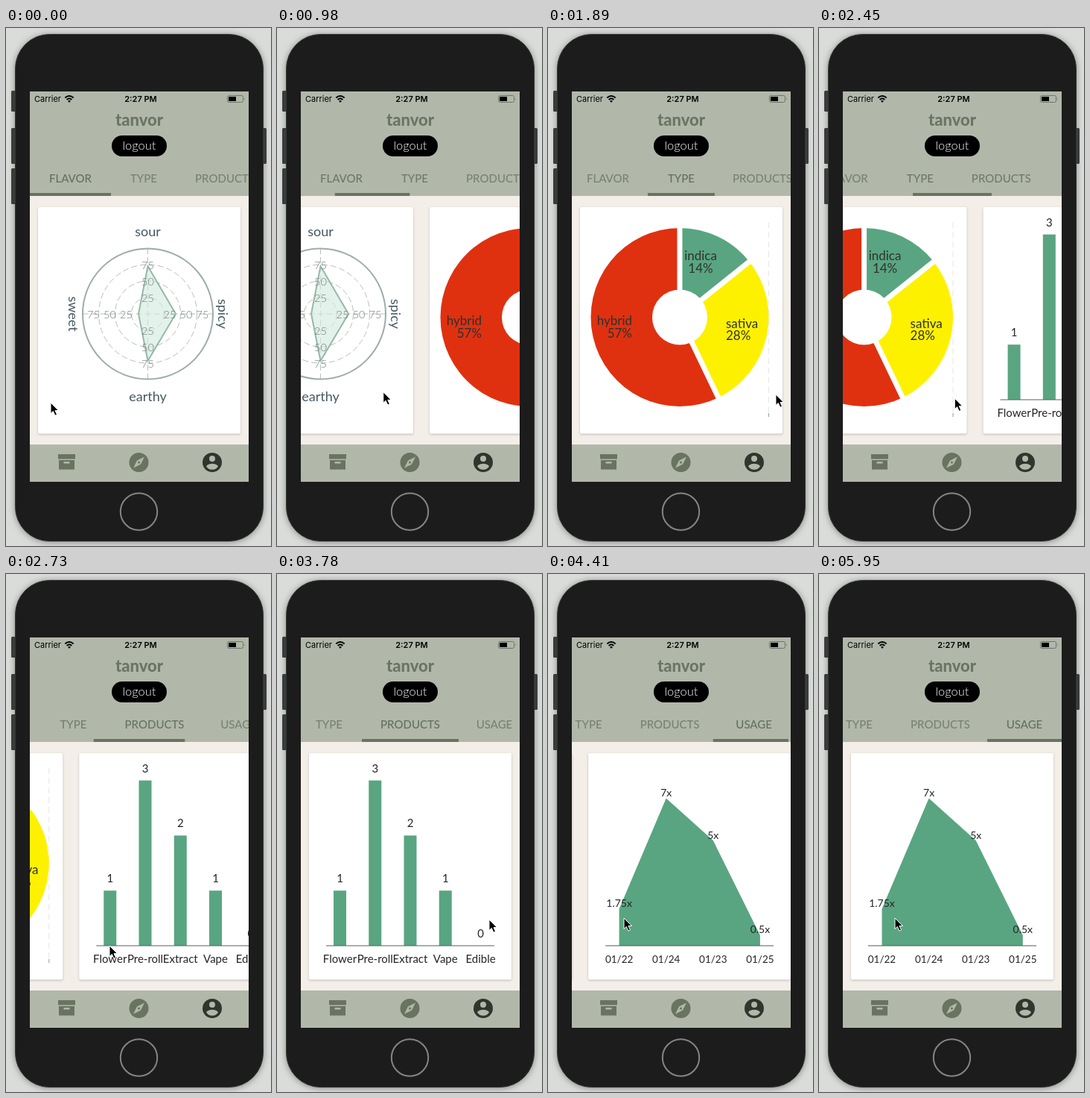
Recreate the animation shown at these times as an HTML page. Size 356 by 694 pixels, loop 6.02 s.

```html
<!DOCTYPE html>
<html lang="en">
<head>
<meta charset="utf-8">
<title>Profile charts</title>
<style>
  html, body { margin: 0; width: 100%; height: 100%; overflow: hidden; background: #d9dcd8; }
  svg { display: block; width: 356px; height: 694px; font-family: Lato, "Open Sans", sans-serif; }
  .status { font-family: Inter, Roboto, sans-serif; font-size: 11px; }
  .phone { filter: drop-shadow(0 1px 4px rgba(60, 64, 60, .55)); }
  .card { fill: #fff; filter: drop-shadow(0 1px 1.5px rgba(0, 0, 0, .22)); }
  .tab { font-size: 15px; font-weight: 500; fill: #657060; }
  .axis { font-size: 15px; fill: #252525; }
  .taste { font-size: 18px; fill: #455a64; }
  .tick { font-size: 14.5px; font-weight: 300; fill: #707b78; }
  .slice { font-size: 17px; fill: #303030; }
  .mid text, text.mid { text-anchor: middle; }
</style>
</head>
<body>
<svg viewBox="0 0 356 694" xmlns="http://www.w3.org/2000/svg">
  <defs>
    <clipPath id="screen"><rect x="32" y="85" width="294" height="523"/></clipPath>
    <clipPath id="body"><rect x="32" y="225" width="294" height="333"/></clipPath>
  </defs>

  <g fill="#3a3b3b">
    <rect x="7" y="84" width="7" height="28" rx="1.5"/>
    <rect x="7" y="134" width="7" height="48" rx="1.5"/>
    <rect x="7" y="188" width="7" height="48" rx="1.5"/>
    <rect x="344" y="134" width="6" height="48" rx="1.5"/>
  </g>
  <rect class="phone" x="12.5" y="8.5" width="333" height="679" rx="46" fill="#1c1c1c" stroke="#343535"/>
  <circle cx="178.5" cy="648" r="24.7" fill="none" stroke="#858585" stroke-width="2"/>

  <rect x="32" y="85" width="294" height="523" fill="#f4eee9"/>
  <g clip-path="url(#body)"><g id="pages"></g></g>

  <g clip-path="url(#screen)">
    <rect x="32" y="85" width="294" height="140" fill="#b1b8aa"/>
    <rect x="32" y="558" width="294" height="50" fill="#b1b8aa"/>
    <g id="tabs" class="mid"></g>
    <rect id="bar" y="221" height="4" fill="#69735f"/>
  </g>

  <g class="status">
    <text x="38" y="99">Carrier</text>
    <text class="mid" x="181" y="99" font-weight="600">2:27 PM</text>
  </g>
  <g fill="none" stroke="#000" stroke-width="1.9">
    <path d="M79.3 93.4q5.7 -4.8 11.4 0M81.6 96q3.4 -2.8 6.8 0"/>
    <path d="M83 97.7q2 -1.5 4 0l-2 2.2z" fill="#000" stroke="none"/>
  </g>
  <rect x="297.5" y="90.5" width="21" height="9" rx="2" fill="none" stroke="#6d7368"/>
  <rect x="299" y="92" width="10" height="6" fill="#000"/>
  <path d="M320 93.5q1.8 1.5 0 3z" fill="#6d7368"/>

  <text class="mid" x="179" y="131" font-size="22" font-weight="800" fill="#6b7562">tanvor</text>
  <rect x="142" y="144" width="74" height="28" rx="14"/>
  <text class="mid" x="179" y="163" font-size="16.5" font-weight="300" fill="#fff">logout</text>

  <g fill="#69735f">
    <path d="M70 571h23v6.500h-23z"/>
    <path d="M71 579h21v12.500h-21zM77.500 581v2.500h8v-2.500z" fill-rule="evenodd"/>
    <circle cx="178.500" cy="582" r="13"/>
  </g>
  <path d="M186 574.500L181 584.500L171 589.500L176 579.500z" fill="#b1b8aa"/>
  <circle cx="178.500" cy="582" r="1.500" fill="#69735f"/>
  <circle cx="277" cy="582" r="13" fill="#30362e"/>
  <circle cx="277" cy="577" r="4" fill="#b1b8aa"/>
  <path d="M269 587.300q2 -3.500 8 -3.500t8 3.500q-3 4.500 -8 4.500t-8 -4.500z" fill="#b1b8aa"/>

  <path id="cursor" d="M0 0V14.500L3.300 11.400L5.900 17.200L8.500 16L6 10.500H10.500Z" stroke="#fff" stroke-width="1"/>
</svg>

<script>
const LOOP = 6020, STEP = 70, PAGE = 294, LEFT = 32;
const GREEN = '#59a581';
const $ = id => document.getElementById(id);

const text = (x, y, s, cls, extra = '') => `<text x="${x}" y="${y}" class="${cls}" ${extra}>${s}</text>`;
const line = (x1, y1, x2, y2, extra) => `<path d="M${x1} ${y1}L${x2} ${y2}" fill="none" ${extra}/>`;
const ring = (r, extra) => `<circle cx="190.500" cy="383" r="${r}" fill="none" ${extra}/>`;

function radar() {
  const cx = 190.5, cy = 383;
  const dash = 'stroke="#b9bebb" stroke-dasharray="8 4"';
  let s = line(cx, cy - 88, cx, cy + 88, dash) + line(cx - 88, cy, cx + 88, cy, dash);
  for (const r of [22, 44, 66]) s += ring(r, dash);
  s += ring(87.5, 'stroke="#9dacaa" stroke-width="2"');
  s += `<path d="M190.500 319L228 383L190.500 446L178 383Z" fill="#d4ebe0" fill-opacity=".65" stroke="#96b9a8" stroke-width="2"/>`;
  [25, 50, 75].forEach((n, i) => {
    const r = 22 * (i + 1);
    s += text(cx, cy - r + 6, n, 'tick mid') + text(cx, cy + r + 6, n, 'tick mid');
    s += text(cx - r - 7, cy + 5.5, n, 'tick mid') + text(cx + r + 7.5, cy + 5.5, n, 'tick mid');
  });
  s += text(190.5, 279, 'sour', 'taste mid') + text(190.5, 500, 'earthy', 'taste mid');
  s += text(0, 0, 'sweet', 'taste mid', 'transform="translate(84 383) rotate(90)"');
  s += text(0, 0, 'spicy', 'taste mid', 'transform="translate(285 383) rotate(90)"');
  return s;
}

function pie() {
  const cx = 177, cy = 387.5, R = 119.5;
  const at = (f, r) => [cx + r * Math.sin(f * 2 * Math.PI), cy - r * Math.cos(f * 2 * Math.PI)];
  const cuts = [0, 1 / 7, 3 / 7, 1];
  let s = line(296.5, 260, 296.5, 516, 'stroke="#e6e6e6" stroke-dasharray="8 5"')
        + line(296.5, 516, 296.5, 521, 'stroke="#999"');
  [GREEN, '#fdf100', '#df3110'].forEach((color, i) => {
    const [a, b] = [cuts[i], cuts[i + 1]];
    s += `<path d="M${cx} ${cy}L${at(a, R)}A${R} ${R} 0 ${b - a > .5 ? 1 : 0} 1 ${at(b, R)}Z" fill="${color}"/>`;
  });
  for (const f of cuts.slice(0, 3)) s += line(cx, cy, ...at(f, R + 2), 'stroke="#fff" stroke-width="7"');
  s += `<circle cx="${cx}" cy="${cy}" r="37" fill="#fff"/>`;
  s += text(205, 311, 'indica', 'slice mid') + text(205, 328, '14%', 'slice mid', 'font-size="16"');
  s += text(239, 402, 'sativa', 'slice') + text(239, 418, '28%', 'slice');
  s += text(113, 398, 'hybrid', 'slice', 'text-anchor="end"') + text(113, 415, '57%', 'slice', 'text-anchor="end"');
  return s;
}

function bars() {
  const names = ['Flower', 'Pre-roll', 'Extract', 'Vape', 'Edible'];
  let s = '';
  [1, 3, 2, 1, 0].forEach((n, i) => {
    const x = 84.5 + 47.25 * i, h = 73.8 * n;
    s += `<rect x="${x - 8.5}" y="${498 - h}" width="17" height="${h}" fill="${GREEN}"/>`;
    s += text(x, 487 - h, n, 'axis mid') + text(x, 521, names[i], 'axis mid');
  });
  return s + line(66, 498, 292, 498, 'stroke="#59605a"');
}

function area() {
  const values = [1.75, 7, 5, .5], days = [22, 24, 23, 25];
  const x = i => 84.5 + 63.1 * i, y = v => 498 - 28.2 * v;
  let s = `<path d="M${x(0)} 498${values.map((v, i) => `L${x(i)} ${y(v)}`).join('')}V498Z" fill="${GREEN}"/>`;
  s += line(66, 498, 292, 498, 'stroke="#4b5f50"');
  values.forEach((v, i) => {
    s += text(x(i), y(v) - 2.5, v + 'x', 'axis mid', 'style="font-size:14px"');
    s += text(x(i), 521, '01/' + days[i], 'axis mid', 'style="font-size:13.5px"');
  });
  return s;
}

$('pages').innerHTML = [radar, pie, bars, area].map((draw, i) =>
  `<g transform="translate(${PAGE * i})"><rect class="card" x="43" y="240" width="272" height="303.500" rx="2"/>${draw()}</g>`).join('');

const tabs = [['FLAVOR', 0, 109], ['TYPE', 108, 90], ['PRODUCTS', 197, 130], ['USAGE', 325, 100]];
$('tabs').innerHTML = tabs.map(([s, x, w]) => text(LEFT + x + w / 2, 207, s, 'tab')).join('');
const labels = [...$('tabs').children];

// Keys are [time, ...values]; a segment listed in `soft` decelerates into its end.
function sample(keys, t, soft = []) {
  const i = keys.findIndex(k => k[0] > t);
  if (i === 0) return keys[0].slice(1);
  if (i < 0) return keys[keys.length - 1].slice(1);
  const a = keys[i - 1], b = keys[i];
  let u = (t - a[0]) / (b[0] - a[0]);
  if (soft.includes(b[0])) u = 1 - (1 - u) ** 3;
  return a.slice(1).map((v, k) => v + (b[k + 1] - v) * u);
}

const scrollKeys = [[700, 0], [1050, 165], [1470, 294], [2100, 294], [2590, 457], [3150, 588],
  [3850, 588], [4200, 758], [4580, 882]];
const settles = [1470, 3150, 4580];
const cursorKeys = [[0, 60, 502], [70, 62, 502], [560, 290, 494], [700, 290, 491], [1050, 106, 487],
  [1330, 106, 488], [1820, 306, 491], [2050, 306, 491], [2590, 139, 498], [3220, 139, 498],
  [3710, 285, 463], [3850, 285, 463], [4200, 102, 461]];
const tabShift = [[0, 0], [.5, 0], [1, 6], [2, 115], [3, 131]];
const barKeys = [[0, 0, 109], [1, 102, 90], [2, 82, 130], [3, 194, 100]];

function render(t) {
  const [scroll] = sample(scrollKeys, t, settles);
  const p = scroll / PAGE;
  $('pages').setAttribute('transform', `translate(${-scroll})`);
  $('tabs').setAttribute('transform', `translate(${-sample(tabShift, p)[0]})`);
  labels.forEach((el, i) => { el.style.opacity = .75 + .25 * Math.max(0, 1 - Math.abs(p - i)); });
  const [x, w] = sample(barKeys, p);
  $('bar').setAttribute('x', LEFT + x);
  $('bar').setAttribute('width', w);
  $('cursor').setAttribute('transform', `translate(${sample(cursorKeys, t)})`);
}

const start = performance.now();
function frame() {
  const t = (performance.now() - start) % LOOP;
  render(Math.floor(t / STEP) * STEP);
  requestAnimationFrame(frame);
}
frame();
</script>
</body>
</html>
```
